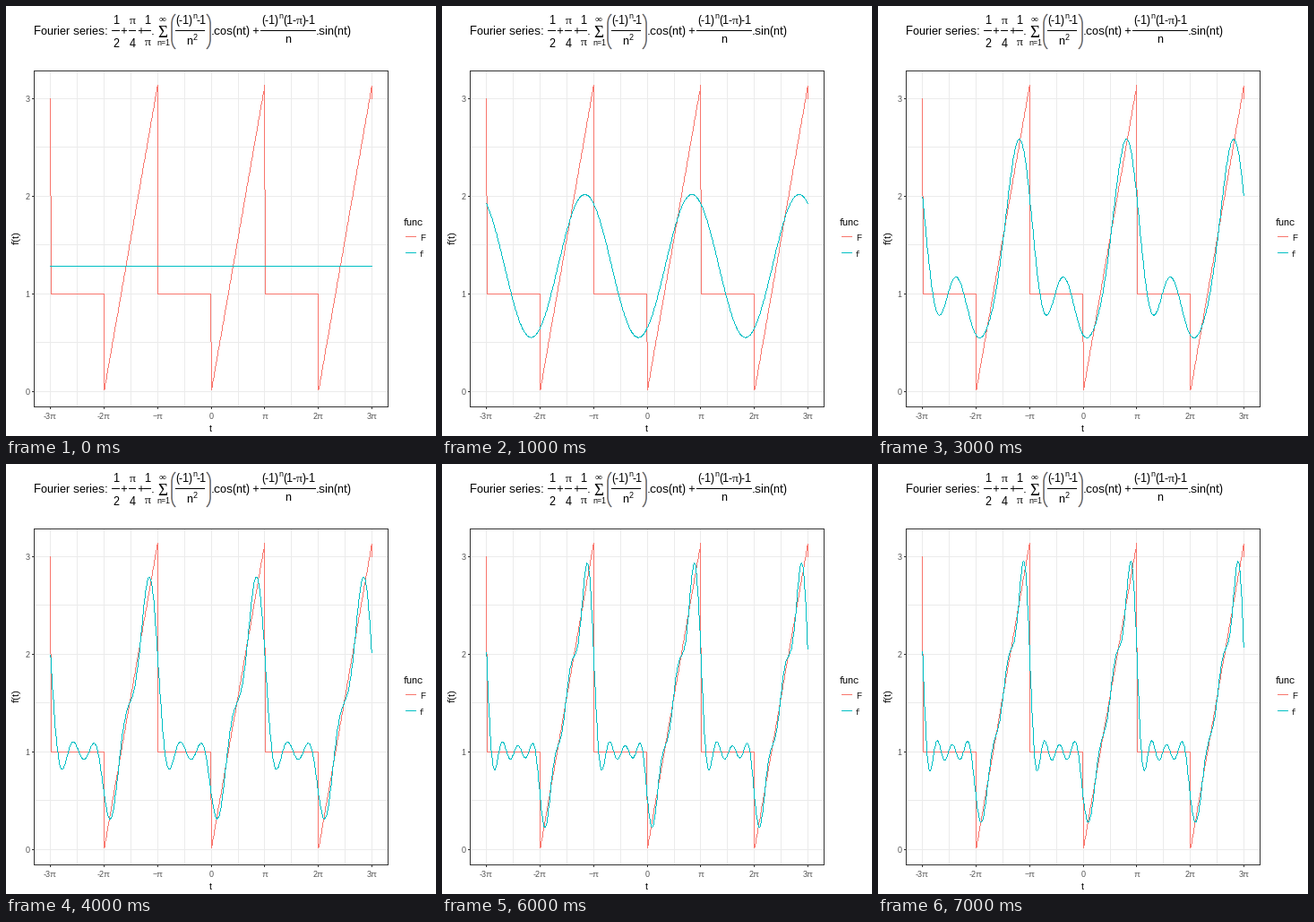
Animation, 480 px wide and 480 px high, one loop 8000 ms. Source, as a matplotlib script:

```python
import numpy as np
import matplotlib
import matplotlib.pyplot as plt
from matplotlib.animation import FuncAnimation
from matplotlib.patches import PathPatch
from matplotlib.path import Path

matplotlib.rcParams["path.simplify"] = False
# Fully hinted glyphs on whole pixels
matplotlib.rcParams["text.hinting"] = "native"
matplotlib.rcParams["text.hinting_factor"] = 1

SIZE = 480
SANS, SERIF = "Liberation Sans", "Liberation Serif"
SALMON, TEAL = "#F8766D", "#00BFC4"
GRID, DARK, TICK_TEXT = "#EBEBEB", "#333333", "#4D4D4D"
LEFT, RIGHT, TOP, BOTTOM = 31.5, 426.5, 72.5, 447.5
BIG, MID, SMALL = 13, 11, 9

# At 72 dpi one point is one pixel
fig = plt.figure(figsize=(SIZE / 72, SIZE / 72), dpi=72, facecolor="white")
ax = fig.add_axes([0, 0, 1, 1])
ax.set_xlim(0, SIZE)
ax.set_ylim(SIZE, 0)
ax.axis("off")


def px(t):
    return np.floor(229.09 + 59.821 * np.asarray(t) / np.pi) + 0.5


def py(v):
    return np.floor(430.2 - 108.9 * np.asarray(v)) + 0.5


def line(xs, ys, color, z=1):
    ax.plot(xs, ys, color=color, lw=1, antialiased=False, snap=False,
            solid_capstyle="projecting", solid_joinstyle="miter", zorder=z)


def pixel_steps(xs, ys):
    """Trace a polyline as one-pixel dashes, without smoothing."""
    dx, dy = np.diff(xs), np.diff(ys)
    steps = np.maximum(np.maximum(abs(dx), abs(dy)), 1).astype(int)
    seg = np.repeat(np.arange(len(steps)), steps)
    first = np.repeat(np.cumsum(steps) - steps, steps)
    part = (np.arange(len(seg)) - first) / steps[seg]
    x = np.floor(np.append(xs[seg] + part * dx[seg], xs[-1]))
    y = np.floor(np.append(ys[seg] + part * dy[seg], ys[-1])) + 0.5
    x, y = np.unique(np.column_stack([x, y]), axis=0).T
    gap = np.full_like(x, np.nan)
    return (np.column_stack([x, x + 1, gap]).ravel(),
            np.column_stack([y, y, gap]).ravel())


def curve(xs, ys, color, z):
    return ax.plot(*pixel_steps(xs, ys), color=color, lw=1, snap=False,
                   solid_capstyle="butt", zorder=z)[0]


def text(x, y, s, size=BIG, ha="left", font=SANS, color="black", **kw):
    ax.text(x, y, s, fontsize=size, ha=ha, va=kw.pop("va", "baseline"),
            family=font, color=color, **kw)


def bar(x0, x1):
    line([x0, x1], [27.5, 27.5], "black")


def paren(x, bulge):
    # Tall bracket with coloured subpixel fringes
    for dx, color in ((-0.5, "#D09A6A"), (0.5, "#5F86C0"), (0, "#555555")):
        e, m = x - bulge + dx, x + bulge + dx
        path = Path([(e, 9), (m, 13), (m, 20), (m, 37), (m, 44), (e, 48)],
                    [1, 3, 3, 2, 3, 3])
        ax.add_patch(PathPatch(path, fill=False, ec=color, lw=0.8))


def draw_title():
    text(31, 32, "Fourier series:")
    text(122.5, 20, "1", ha="center")
    text(122.5, 46, "2", ha="center")
    bar(118.5, 126.5)
    text(127, 32, "+")
    text(141, 20, "π", ha="center", font=SERIF)
    text(141, 46, "4", ha="center")
    bar(137.5, 144.5)
    text(146, 32, "+")
    text(158, 20, "1", ha="center")
    text(158, 44, "π", ha="center", font=SERIF)
    bar(154.5, 161.5)
    text(162, 32, ".")
    text(174.5, 18, "∞", MID, "center", SERIF)
    text(174.5, 35, "Σ", 19, "center", SERIF)
    text(175.5, 44, "n=1", SMALL, "center")
    paren(187, -2)
    text(189, 20, "(-1)")
    text(208, 14, "n", SMALL)
    text(212, 20, "-1")
    bar(189.5, 221.5)
    text(201, 43, "n")
    text(209, 38, "2", SMALL)
    paren(226, 2)
    text(229, 32, ".cos(nt)")
    text(274, 32, "+")
    text(285, 20, "(-1)")
    text(304, 14, "n", SMALL)
    text(309, 20, "(1-")
    text(324, 20, "π", font=SERIF)
    text(331, 20, ")-1")
    bar(284.5, 345.5)
    text(315, 41, "n", ha="center")
    text(346, 32, ".sin(nt)")


def draw_panel():
    for k in np.arange(-3, 3.1, 0.5):
        x = px(k * np.pi)
        line([x, x], [TOP, BOTTOM], GRID)
    for v in np.arange(0, 3.1, 0.5):
        line([LEFT, RIGHT], [py(v), py(v)], GRID)
    line([LEFT, RIGHT, RIGHT, LEFT, LEFT], [TOP, TOP, BOTTOM, BOTTOM, TOP],
         DARK, 5)

    style = dict(size=SMALL, color=TICK_TEXT)
    labels = ["-3π", "-2π", "−π", "0", "π", "2π", "3π"]
    for k, label in enumerate(labels, -3):
        x = px(k * np.pi)
        line([x, x], [BOTTOM, BOTTOM + 2], DARK)
        text(x, 461, label, ha="center", **style)
    for v in range(4):
        y = py(v)
        line([LEFT - 2, LEFT], [y, y], DARK)
        text(26.5, y + 3.5, str(v), ha="right", **style)
    text(228.5, 475, "t", MID, "center")
    text(17, 258.5, "f(t)", MID, "right", rotation=90, va="center")


def draw_legend():
    text(444, 245, "func", MID)
    for y, name, color in ((257.5, "F", SALMON), (275.5, "f", TEAL)):
        line([446.5, 457.5], [y, y], color)
        text(462, y + 4.5, name, SMALL)


t = np.arange(-3 * np.pi, 3 * np.pi, 0.02)


def target(t):
    u = (t + np.pi) % (2 * np.pi) - np.pi
    return np.where(u < 0, 1, u)


def partial_sum(count):
    total = np.full_like(t, 0.5 + np.pi / 4)
    for n in range(1, count + 1):
        sign = (-1) ** n
        total += (sign - 1) / (np.pi * n * n) * np.cos(n * t)
        total += (sign * (1 - np.pi) - 1) / (np.pi * n) * np.sin(n * t)
    return total


draw_title()
draw_panel()
draw_legend()

wave = target(t)
wave[0] = 3
curve(px(np.append(t, 3 * np.pi)), py(np.append(wave, 3)), SALMON, 3)
series = curve(px(t), py(partial_sum(0)), TEAL, 4)


def update(i):
    series.set_data(*pixel_steps(px(t), py(partial_sum(i))))
    return (series,)


anim = FuncAnimation(fig, update, frames=8, interval=1000, repeat=True,
                     repeat_delay=0, blit=False)
plt.show()
```
